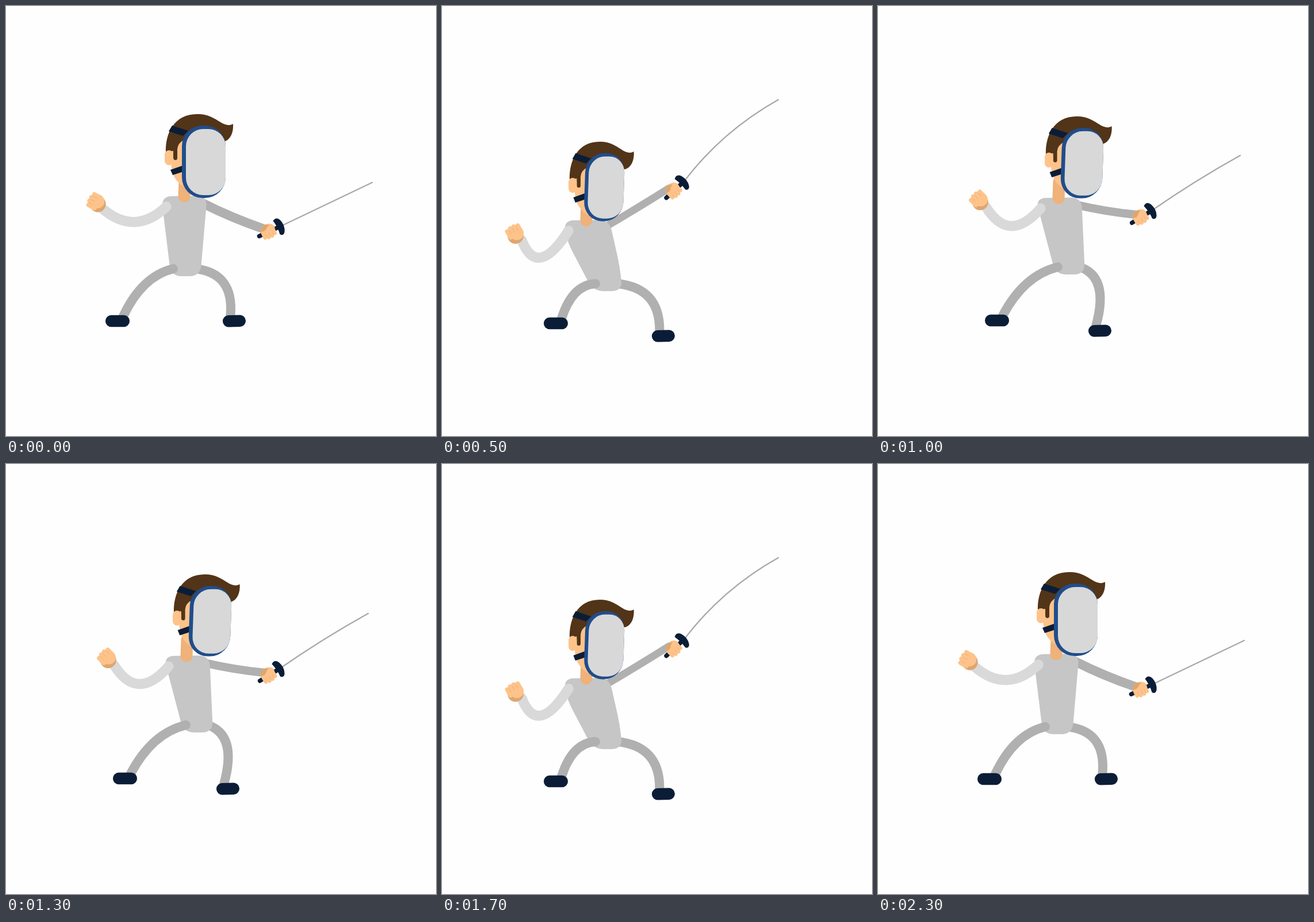
Recreate the animation shown at these times as an HTML page with a canvas. Size 748 px wide and 748 px high, loop 2400 ms.

```html
<!DOCTYPE html>
<html lang="en">
<head>
<meta charset="utf-8">
<title>Fencer</title>
<style>
  html, body { margin: 0; width: 100%; height: 100%; overflow: hidden; background: #fefefe; }
  canvas { display: block; width: 100vw; height: 100vh; }
</style>
</head>
<body>
<canvas id="stage"></canvas>
<script>
const SIZE = 748;
const STEP_MS = 100;
const LAST = 5;
const canvas = document.getElementById('stage');
const ctx = canvas.getContext('2d');
const ratio = window.devicePixelRatio || 1;
canvas.width = canvas.height = SIZE * ratio;

const COLOR = {
  back: '#fefefe', hair: '#523418', navy: '#0b1d36', blue: '#204d8c',
  mask: '#d8d8d8', torso: '#c6c6c6', limb: '#b0b0b0', sleeve: '#d9d9d9',
  skin: '#fdc38a', neck: '#eeb27a', shade: '#dca670', blade: '#a9a9a9'
};

// Key points of the rig at the steps in KNOTS; all else follows from them.
const KNOTS = [0, 1, 3, 5];
const RIG = {
  head: [[278, 188], [292, 192], [271, 210], [222, 236]],
  chest: [[310, 331], [314, 334], [297, 348], [251, 373]],
  hip: [[291, 457], [313, 454], [318, 455], [267, 483]],
  footL: [[194, 548], [207, 547], [208, 545], [198, 552]],
  footR: [[397, 548], [386, 565], [383, 570], [385, 574]],
  handL: [[157, 342], [176, 338], [172, 358], [127, 396]],
  handR: [[456, 391], [456, 366], [438, 333], [402, 320]],
  tip: [[637, 307], [630, 260], [617, 200], [585, 163]]
};

const add = ([x, y], dx, dy) => [x + dx, y + dy];
const lerp = (a, b, k) => [a[0] + (b[0] - a[0]) * k, a[1] + (b[1] - a[1]) * k];
const distance = (a, b) => Math.hypot(b[0] - a[0], b[1] - a[1]);

// Smooth curve through the key points.
function poseAt(step) {
  const weights = KNOTS.map(a => KNOTS.reduce(
    (w, b) => a === b ? w : w * (step - b) / (a - b), 1));
  const pose = {};
  for (const name in RIG) {
    pose[name] = [0, 1].map(axis =>
      RIG[name].reduce((sum, p, i) => sum + weights[i] * p[axis], 0));
  }
  return pose;
}

function fill(path, color) {
  ctx.fillStyle = color;
  ctx.fill(new Path2D(path));
}

function stroke(path, color, width) {
  ctx.strokeStyle = color;
  ctx.lineWidth = width;
  ctx.lineCap = 'round';
  ctx.stroke(new Path2D(path));
}

function ellipse(x, y, rx, ry, color) {
  ctx.fillStyle = color;
  ctx.beginPath();
  ctx.ellipse(x, y, rx, ry, 0, 0, Math.PI * 2);
  ctx.fill();
}

function box(x, y, w, h, r, color) {
  ctx.fillStyle = color;
  ctx.beginPath();
  ctx.roundRect(x, y, w, h, r);
  ctx.fill();
}

function placed([x, y], angle, paint) {
  ctx.save();
  ctx.translate(x, y);
  ctx.rotate(angle);
  paint();
  ctx.restore();
}

// A curved limb whose bend is an offset from the middle of its ends.
function limb(from, to, bendX, bendY, color, width) {
  const bend = add(lerp(from, to, .5), bendX, bendY);
  stroke(`M${from}Q${bend} ${to}`, color, width);
}

function drawTorso(chest, hip) {
  const lean = Math.max(0, hip[0] - chest[0]);
  const topL = add(chest, -40, 0), topR = add(chest, 40, -1);
  const lowL = add(hip, -4, 13), lowR = add(hip, 47, 13);
  const waistL = add(lerp(topL, lowL, .3), -lean * .55, 0);
  const waistR = add(lerp(topR, lowR, .65), lean * .2, 0);
  const points = [topL, topR, waistR, lowR, lowL, waistL];
  const toward = (a, b) => lerp(a, b, Math.min(19 / distance(a, b), .5));
  const path = points.map((p, i) => {
    const start = toward(p, points[(i + 5) % 6]);
    const end = toward(p, points[(i + 1) % 6]);
    return `${i ? 'L' : 'M'}${start}Q${p} ${end}`;
  });
  fill(path.join('') + 'Z', COLOR.torso);
}

// The head narrows a little and its front tilts while leaning back.
function drawHead(head, step) {
  const squash = Math.sqrt(step);
  const tilt = -.07 * Math.sin(Math.PI * step / 6);
  ctx.save();
  ctx.translate(...head);
  ctx.scale(1 - .02 * squash, 1);
  ctx.translate(-278, -188);
  fill('M287 240L312 234V316Q298 308 292 296Q287 284 287 268Z', COLOR.skin);
  fill('M278 254C277 222 292 188 333 188C352 188 363 196 373 202C381 207 389 209 395 205' +
    'C396 221 390 233 379 236L310 233Q299 238 298 249V264Q298 268 295 268Q291 268 291 264V252Z', COLOR.hair);
  box(276, 251, 15, 26, 7.5, COLOR.skin);
  fill('M289 208L317 217L308 226L283 218Z', COLOR.navy);
  ctx.transform(1, 0, tilt, 1, -250 * tilt, 0);
  fill('M286 285L309 277V288L290 294Z', COLOR.navy);
  ctx.translate(306, 208);
  ctx.scale(1 - .027 * squash, 1 - .027 * squash);
  box(0, 0, 76, 126, 36, COLOR.blue);
  box(7, 6, 69, 115, 30, COLOR.mask);
  ctx.restore();
}

function drawLeg(hip, ankle, foot, bendX, bendY, toe, tilt) {
  limb(hip, ankle, bendX, bendY, COLOR.limb, 16);
  placed(foot, tilt, () => stroke(`M${-toe} 0H${toe}`, COLOR.navy, 20.5));
}

// The free arm sags and the fist turns up as the reach gets shorter.
function drawFreeArm(shoulder, hand) {
  const wrist = add(hand, 11.5, 11);
  const slack = 110 - distance(shoulder, wrist);
  limb(shoulder, wrist, -slack / 2, 50 + slack, COLOR.sleeve, 17.5);
  placed(hand, .52 + slack * .02, () => {
    ellipse(4, 1, 13.5, 14, COLOR.shade);
    ellipse(1, -3, 12, 12, COLOR.skin);
    for (let i = 0; i < 4; i++) {
      const y = 10 - 7 * i;
      stroke(`M2 ${y}H${i % 3 ? -12 : -10}`, COLOR.skin, 7.5);
      if (i) stroke(`M-3 ${y + 3.5}H-11`, COLOR.neck, 1);
    }
  });
}

// The blade bows more with every step of the lean.
function drawSword(hand, tip, step) {
  const angle = Math.atan2(tip[1] - hand[1], tip[0] - hand[0]) - .008 * step;
  const cos = Math.cos(angle), sin = Math.sin(angle);
  const bow = 4.5 * step;
  const start = add(hand, 24 * cos - 2 * sin, 24 * sin + 2 * cos);
  limb(start, tip, bow * sin, -bow * cos, COLOR.blade, 2.4);
  placed(hand, angle, () => {
    stroke('M-18 2H17', COLOR.navy, 7.5);
    fill('M15-12Q23-17 27-8Q31 4 25 14Q20 20 16 14Q18 2 15-12Z', COLOR.navy);
    ellipse(0, -2, 13, 10, COLOR.skin);
    fill('M-13-3Q-10-12 0-12L6-8Q-2-7-7 2Q-13 2-13-3Z', COLOR.shade);
    for (let i = 0; i < 4; i++) {
      const x = 6.3 * i - 10;
      stroke(`M${x} 0V${i % 3 ? 11 : 9}`, COLOR.skin, 6.5);
      if (i) stroke(`M${x - 3} 4V10`, COLOR.neck, 1);
    }
  });
}

function draw(step) {
  const { head, chest, hip, footL, footR, handL, handR, tip } = poseAt(step);
  ctx.setTransform(ratio, 0, 0, ratio, 0, 0);
  ctx.fillStyle = COLOR.back;
  ctx.fillRect(0, 0, SIZE, SIZE);

  limb(add(chest, 32, 12), add(handR, -7, -3), -3, 3, COLOR.limb, 16 - 1.4 * Math.sqrt(step));
  drawLeg(add(hip, 38, 0), add(footR, -6.5, -10), footR, 37, -33, 9.8, -.03);
  drawTorso(chest, hip);
  stroke(`M${add(chest, 1, -28)}L${chest}`, COLOR.neck, 21);
  drawHead(head, step);
  drawLeg(hip, add(footL, 10, -8.5), footL, -11, -28, 10.8, 0);
  drawFreeArm(add(chest, -31, 18), handL);
  drawSword(handR, tip, step);
}

// Lean back, hold, return, hold.
function tick() {
  const count = 2 * (LAST + 1);
  const index = Math.floor(performance.now() / STEP_MS) % count;
  draw(Math.min(index, count - 1 - index));
  requestAnimationFrame(tick);
}
tick();
</script>
</body>
</html>
```
